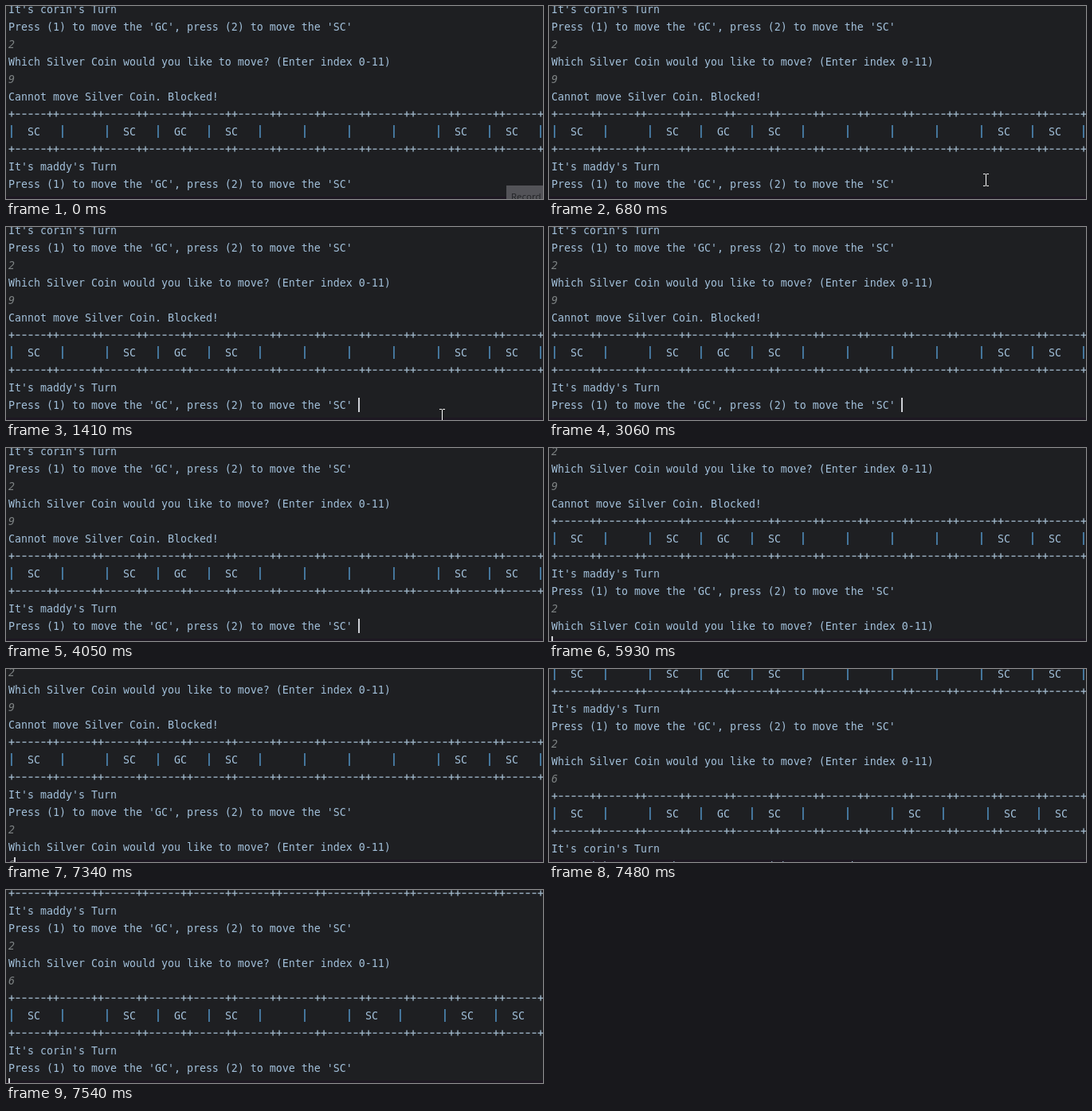
These frames come from a looping animation (674 by 243 pixels, 8000 ms). An HTML page with a canvas:

```html
<!DOCTYPE html>
<html lang="en">
<head>
<meta charset="utf-8">
<style>
  html, body { margin: 0; overflow: hidden; background: #1e1f22; }
  canvas { display: block; }
</style>
</head>
<body>
<canvas id="stage" width="674" height="243"></canvas>
<script>
const ctx = document.getElementById('stage').getContext('2d', { alpha: false });
const LOOP = 8000, COL = 8, LINE = 22, LEFT = 3, BLINK = 500, CARET_START = 1050;
const MONO = '13.29px "DejaVu Sans Mono", monospace';
const TEXT = '#a2c0da', RULE = '#a3bccf', PIPE = '#5292c4', INPUT = '#7d8283';

const turn = name => `It's ${name}'s Turn`;
const press = "Press (1) to move the 'GC', press (2) to move the 'SC' ";
const which = 'Which Silver Coin would you like to move? (Enter index 0-11)';
const border = { border: true };
const board = cells => ({ cells: [...cells] });

// Console transcript; one-character lines are typed input
const lines = [
  turn('corin'), press, '2', which, '9', 'Cannot move Silver Coin. Blocked!',
  border, board('S.SGS....SS'), border, turn('maddy'), press,
  '2', which, '6',
  border, board('S.SGS..S.SS'), border, turn('corin'), press
];

// Where the console ends after each key press or output
const states = [
  { start: 0, row: 10, col: press.length, scroll: 0 },
  { start: 4790, row: 11, col: 1, scroll: 0 },
  { start: 5930, row: 13, col: 0, scroll: 2 * LINE },
  { start: 7340, row: 13, col: 1, scroll: 2 * LINE },
  { start: 7480, row: 19, col: 0, scroll: 7 * LINE - 2 },
  { start: 7540, row: 19, col: 0, scroll: 8 * LINE }
];

// Mouse path as time, x, y
const path = [
  [480, 564, 227], [680, 548, 211], [880, 548, 211], [1020, 555, 214],
  [1150, 547, 229], [1410, 547, 229], [1550, 537, 235], [1750, 537, 235]
];

function rect(x, y, w, h, color) {
  ctx.fillStyle = color;
  ctx.fillRect(x, y, w, h);
}

function write(text, x, y, color, font = MONO) {
  ctx.font = font;
  ctx.fillStyle = color;
  ctx.fillText(text, x, y);
}

function drawBorder(y) {
  for (let col = 0; col < 84; col++) {
    const x = LEFT + col * COL;
    if (col % 7 % 6) rect(x + 1.5, y - 5.5, 5, 1.3, RULE);
    else {
      rect(x + 0.5, y - 5.5, 7, 1.3, RULE);
      rect(x + 3.4, y - 8.5, 1.3, 7, RULE);
    }
  }
}

function drawBoard(cells, y) {
  let x = LEFT;
  const pipe = () => rect(x + 3.2, y - 13, 1.5, 16, PIPE);
  for (const cell of cells) {
    pipe();
    if (cell !== '.') write(cell + 'C', x + 3 * COL, y, TEXT);
    x += (cell === '.' ? 7 : 8) * COL;
  }
  pipe();
}

function drawLine(line, y) {
  if (line.border) drawBorder(y);
  else if (line.cells) drawBoard(line.cells, y);
  else if (line.length === 1) write(line, LEFT, y, INPUT, 'italic ' + MONO);
  else write(line, LEFT, y, TEXT);
}

function drawCaret({ start, row, col, scroll }, t) {
  const blinkOn = (t - CARET_START) % (2 * BLINK) < BLINK;
  const justTyped = start > 0 && t - start < BLINK;
  if (t < CARET_START || !(blinkOn || justTyped)) return;
  rect(Math.max(LEFT, LEFT - 1 + col * COL), row * LINE - 5 - scroll, 2, 18, '#ced0d6');
}

function drawPointer(t) {
  const next = path.findIndex(([time]) => time > t);
  if (next < 1) return;
  const [from, to] = [path[next - 1], path[next]];
  const k = (t - from[0]) / (to[0] - from[0]);
  const [, x, y] = from.map((v, i) => Math.round(v + (to[i] - v) * k));
  for (const end of [y, y + 15]) {
    rect(x - 3, end, 3, 1, '#fff');
    rect(x + 1, end, 3, 1, '#fff');
  }
  rect(x, y + 1, 1, 14, '#fff');
}

function draw(t) {
  const state = states.findLast(({ start }) => start <= t);
  const shown = state.row + (state.col > 0);
  rect(0, 0, 674, 243, '#1e1f22');
  rect(0, 240, 674, 3, '#1d1822');
  lines.slice(0, shown).forEach((line, i) => drawLine(line, 9 + i * LINE - state.scroll));
  drawCaret(state, t);
  drawPointer(t);
  if (t < 70) {
    rect(628, 226, 46, 17, '#535358');
    write('Record', 634, 244, '#222326', '11.5px "Open Sans", sans-serif');
  }
}

function tick() {
  draw(performance.now() % LOOP);
  requestAnimationFrame(tick);
}
tick();
</script>
</body>
</html>
```
